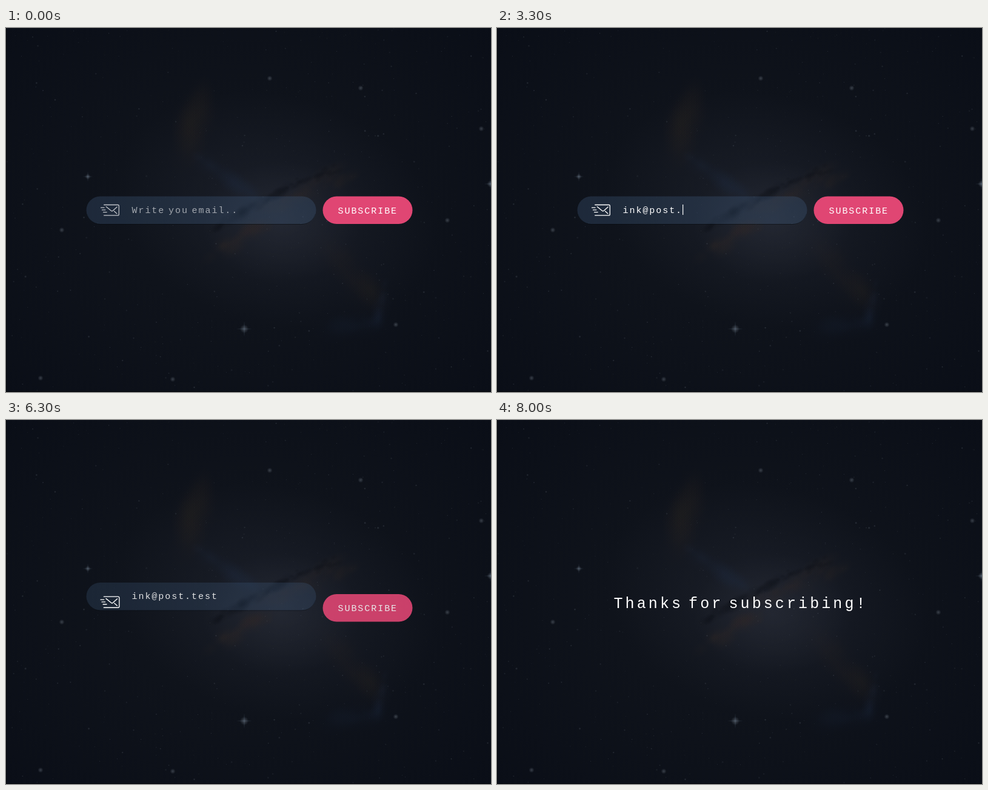
These frames come from a looping animation (800 by 600 pixels, 9.33 s). An HTML page with a canvas:

```html
<!DOCTYPE html>
<html lang="en">
<head>
<meta charset="utf-8">
<title>Subscribe form</title>
<style>
  html, body { margin: 0; width: 100%; height: 100%; overflow: hidden; background: #0d1119; }
  canvas, svg { position: absolute; left: 0; top: 0; }
  text { font: 15px "Liberation Mono", monospace; letter-spacing: 1.95px; word-spacing: -5.2px; fill: #fff; }
  #thanks { font-size: 25px; letter-spacing: 4.1px; word-spacing: -10.1px; }
  #icon { fill: none; stroke: #fff; stroke-width: 1.3; stroke-linecap: round; stroke-linejoin: round; }
  #pointer path { stroke: #fff; stroke-width: 1; stroke-linejoin: round; fill: #000; }
</style>
</head>
<body>
<canvas id="sky" width="800" height="600"></canvas>
<svg width="800" height="600" viewBox="0 0 800 600">
  <g id="field">
    <path d="M134 307A23 23 0 0 0 155.500 323.500H488A23 23 0 0 0 510 307" fill="none" stroke="#05080d" stroke-opacity=".5"/>
    <rect x="132.500" y="277.500" width="379" height="45.500" rx="22.750" fill="#435f81" fill-opacity=".31"/>
    <text id="hint" x="207.500" y="305">Write you email..</text>
    <text id="typed" x="207.500" y="305"></text>
    <rect id="caret" y="291" width="1.200" height="17" fill="#fff"/>
  </g>
  <g id="button">
    <rect id="pill" x="522.500" y="277.500" width="148" height="45.500" rx="22.750"/>
    <text x="547.500" y="305.500">SUBSCRIBE</text>
  </g>
  <g id="icon">
    <path d="M-9.800-8.700H12.800Q14.800-8.700 14.800-6.700V6.700Q14.800 8.700 12.800 8.700H-9.800
             M-15-4H-9.500M-13-.3H-7.700M-11 3.400H-5.300
             M-6.300-5.600L2 1.100Q3.300 2 4.600 1.100L11.600-5.300M7 1.700L11.400 5.700"/>
  </g>
  <text id="thanks" x="192.500" y="310">Thanks for subscribing!</text>
  <g id="pointer">
    <path id="arrow" d="M0 0V16L3.700 12.500L6.200 18L8.700 17L6.300 11.600H11.300Z"/>
    <path id="beam" d="M-3-9H3M0-9V9M-3 9H3"/>
    <path id="hand" d="M-1.500 0Q0-2 1.500 0V6L8 8Q9.500 8.500 9 11L7.500 17H-1.500L-6 10Q-6 7.500-3.500 9L-1.500 11Z"/>
  </g>
</svg>
<script>
const LOOP = 9330;
const $ = id => document.getElementById(id);
const clamp = v => Math.max(0, Math.min(1, v));
const span = (t, from, to) => clamp((t - from) / (to - from));
const mix = (a, b, p) => a + (b - a) * p;
const easeIn = p => p * p;
const easeOut = p => 1 - (1 - p) ** 3;
const easeInOut = p => p < .5 ? 2 * p * p : 1 - 2 * (1 - p) ** 2;

// ---- Night sky ----
const ctx = $('sky').getContext('2d');
let seed = 71;
const random = () => (seed = (seed * 16807) % 2147483647) / 2147483647;

function glow(x, y, rx, ry, degrees, rgb, alpha) {
  ctx.save();
  ctx.translate(x, y);
  ctx.rotate(degrees * Math.PI / 180);
  ctx.scale(rx, ry);
  const fade = ctx.createRadialGradient(0, 0, 0, 0, 0, 1);
  fade.addColorStop(0, `rgba(${rgb},${alpha})`);
  fade.addColorStop(.5, `rgba(${rgb},${alpha * .5})`);
  fade.addColorStop(1, `rgba(${rgb},0)`);
  ctx.fillStyle = fade;
  ctx.fillRect(-1, -1, 2, 2);
  ctx.restore();
}

const star = (x, y, r, alpha) => glow(x, y, r, r, 0, '120,130,142', alpha);

function flare(x, y, r) {
  star(x, y, r * .5, .5);
  glow(x, y, r, 1.2, 0, '95,115,135', .35);
  glow(x, y, 1.2, r, 0, '95,115,135', .35);
}

// A string of soft puffs along a straight run, each scattered a little.
function drift(count, x0, y0, x1, y1, size, scatter, rgb, alpha) {
  const tilt = Math.atan2(y1 - y0, x1 - x0) * 180 / Math.PI;
  for (let i = 0; i < count; i++) {
    const p = random(), r = size * (.5 + random());
    const x = mix(x0, x1, p) + (random() - .5) * scatter;
    const y = mix(y0, y1, p) + (random() - .5) * scatter;
    glow(x, y, r, r * .6, tilt, rgb, alpha);
  }
}

function paintSky() {
  const brown = '54,42,34', blue = '32,48,76', dark = '11,14,21';
  ctx.fillStyle = '#0a0e17';
  ctx.fillRect(0, 0, 800, 600);
  glow(400, 300, 560, 460, 0, '20,24,31', .8);
  glow(445, 300, 270, 190, 15, '34,38,50', .55);
  glow(455, 320, 130, 100, 0, '46,50,61', .45);

  // Curling plumes
  drift(14, 320, 110, 302, 190, 42, 36, brown, .055);
  drift(10, 310, 210, 410, 275, 26, 6, blue, .09);
  drift(14, 530, 345, 595, 450, 42, 30, brown, .05);
  drift(10, 628, 425, 612, 485, 22, 12, blue, .07);
  drift(8, 520, 495, 610, 485, 32, 10, blue, .045);

  // Dust lane
  drift(28, 345, 375, 430, 318, 20, 22, brown, .09);
  drift(34, 425, 305, 570, 234, 22, 26, brown, .08);
  drift(40, 335, 333, 465, 264, 13, 12, dark, .22);
  drift(24, 455, 266, 545, 230, 8, 14, dark, .22);

  for (let i = 0; i < 460; i++)
    star(random() * 800, random() * 600, .8 + 1.3 * random() ** 4, .1 + random() * .22);

  const bright = [[435, 83], [92, 333], [57, 577], [275, 579], [585, 99], [728, 317], [643, 489], [784, 166]];
  for (const [x, y] of bright) star(x, y, 4.5, .42);
  flare(393, 496, 14);
  flare(135, 245, 9);
  flare(799, 257, 11);

  ctx.fillStyle = '#04060a';
  ctx.fillRect(0, 0, 1, 600);
  ctx.fillRect(0, 599, 800, 1);
}

// ---- Form ----
const ADDRESS = 'ink@post.test';
const ADVANCE = 10.95;
const keyTimes = [1330, 1500, 1730, 2170, 2530, 2600, 2900, 3100, 3300, 3530, 4050, 4330, 4470];
const moves = [
  [[30, 783, 598], [530, 309, 298], [1330, 309, 298]],
  [[5110, 333, 298], [5550, 600, 302], [5720, 600, 302], [5900, 645, 388], [6080, 745, 397]]
];

function pointerAt(t) {
  const path = moves.find(m => t >= m[0][0] && t < m.at(-1)[0]);
  if (!path) return null;
  const i = path.findIndex(k => k[0] > t);
  const [t0, x0, y0] = path[i - 1], [t1, x1, y1] = path[i];
  const p = easeInOut(span(t, t0, t1));
  return { x: mix(x0, x1, p), y: mix(y0, y1, p) };
}

const show = (id, visible) => $(id).setAttribute('visibility', visible ? 'visible' : 'hidden');
const move = (id, value) => $(id).setAttribute('transform', value);
const fade = (id, value) => $(id).setAttribute('opacity', value);

function drawPointer(t) {
  const at = pointerAt(t);
  const inRow = at && at.y > 277 && at.y < 323;
  const onField = inRow && at.x > 132 && at.x < 511;
  const onButton = inRow && at.x > 522 && at.x < 670;
  show('arrow', at && !onField && !onButton);
  show('beam', onField);
  show('hand', onButton);
  if (at) move('pointer', `translate(${at.x} ${at.y})`);
  $('pill').setAttribute('fill', onButton ? '#d8436f' : '#e04673');
}

function draw(t) {
  const focus = span(t, 900, 1300);
  const typed = keyTimes.filter(k => k <= t).length;
  $('typed').textContent = ADDRESS.slice(0, typed);
  fade('hint', typed ? 0 : .58 * (1 - focus));
  $('caret').setAttribute('x', 207.5 + typed * ADVANCE);
  show('caret', t >= 930 && t < 4960);

  const leave = easeIn(span(t, 6080, 6700));
  move('field', `translate(0 ${-75 * leave})`);
  move('button', `translate(0 ${75 * leave})`);
  fade('field', 1 - leave);
  fade('button', 1 - leave * .8 - span(t, 6500, 6700) * .2);

  const grow = mix(1, 1.7, easeInOut(span(t, 6200, 6830)));
  const fly = 690 * easeIn(span(t, 6840, 7270));
  move('icon', `translate(${171.5 + fly} 300.2) scale(${grow})`);
  fade('icon', mix(.72, 1, focus));

  const arrive = span(t, 7500, 8000);
  move('thanks', `translate(0 ${-95 * (1 - easeOut(arrive))})`);
  fade('thanks', arrive);

  drawPointer(t);
}

paintSky();
const start = performance.now();
function tick() {
  draw((performance.now() - start) % LOOP);
  requestAnimationFrame(tick);
}
tick();
</script>
</body>
</html>
```
